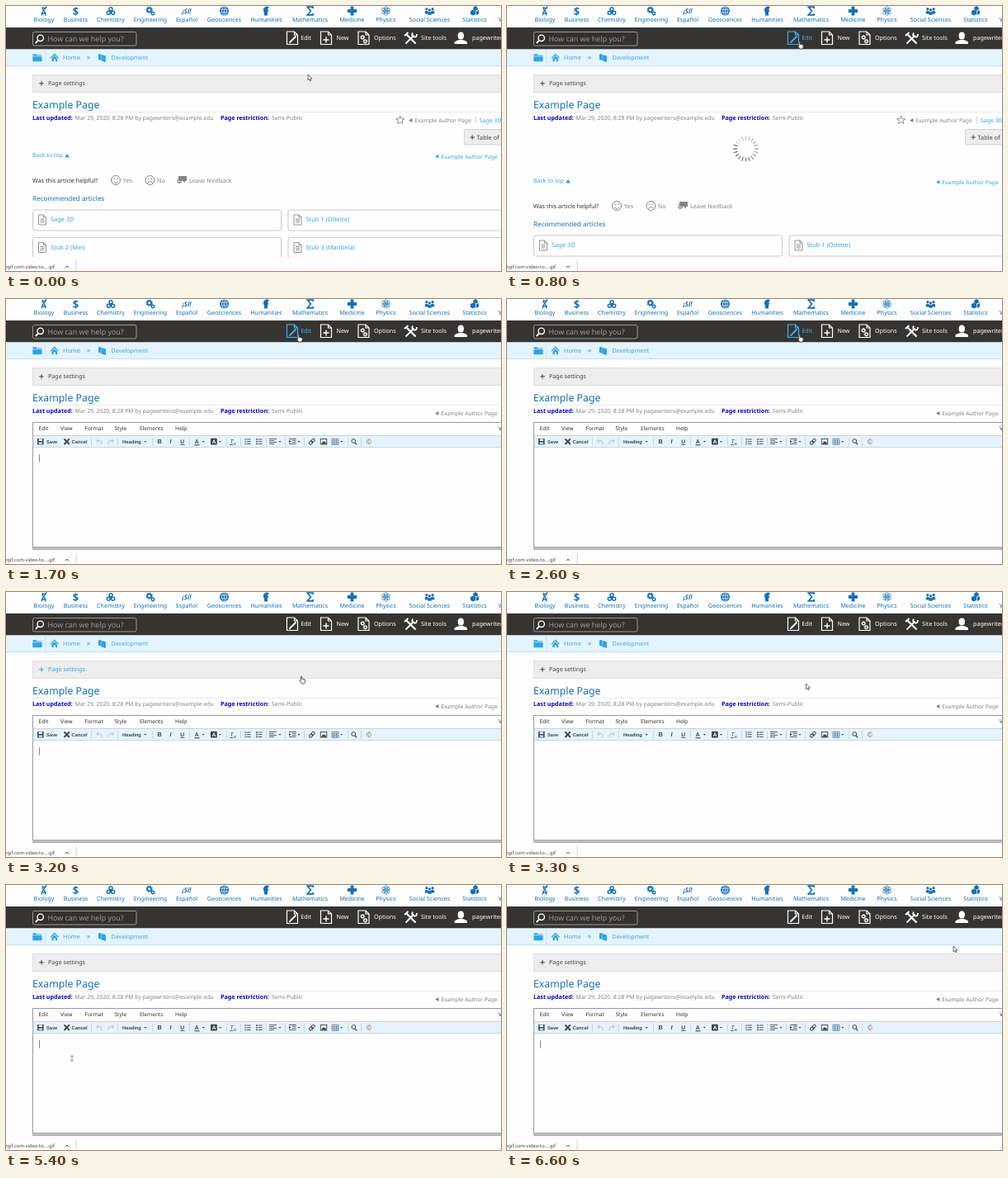
Write an HTML page that moves like this. It is 600x321 px and loops after 6.7 s.

```html
<!DOCTYPE html>
<html lang="en">
<head>
<meta charset="utf-8">
<title>Editing a page</title>
<style>
  html, body { margin: 0; width: 100%; height: 100%; overflow: hidden; background: #fefefe; }
  svg { display: block; width: 100%; height: 100%; text-rendering: geometricPrecision; }
  text { font-family: "Noto Sans", "Open Sans", sans-serif; white-space: pre; }
  .ui { font-family: "Liberation Sans", Arial, sans-serif; }
  .line { fill: none; stroke: currentColor; }
</style>
</head>
<body>
<svg id="stage" viewBox="0 0 600 321"></svg>
<script>
const LOOP = 6700, STEP = 100;
const CLICK = 700, EDITOR_READY = 1500, FOCUS = 4400;
const BLUE = '#1870b2', LINK = '#3aa5e6', GREY = '#858585', DARK = '#444';

const text = (x, y, str, size = 7.1, fill = 'currentColor', extra = '') =>
  `<text x="${x}" y="${y}" font-size="${size}" fill="${fill}" ${extra}>${str}</text>`;
const mid = (x, y, str, size, fill, extra = '') =>
  text(x, y, str, size, fill, `text-anchor="middle" ${extra}`);
const rect = (x, y, w, h, fill, extra = '') =>
  `<rect x="${x}" y="${y}" width="${w}" height="${h}" fill="${fill}" ${extra}/>`;
const line = (d, width = 1, extra = '') => `<path class="line" d="${d}" stroke-width="${width}" ${extra}/>`;
const fill = (d, color = 'currentColor') => `<path d="${d}" fill="${color}"/>`;
const dot = (x, y, r, color = 'currentColor') => `<circle cx="${x}" cy="${y}" r="${r}" fill="${color}"/>`;
const ring = (x, y, r, width = 1, extra = '') =>
  `<circle class="line" cx="${x}" cy="${y}" r="${r}" stroke-width="${width}" ${extra}/>`;
const at = (x, y, body) => `<g transform="translate(${x} ${y})">${body}</g>`;
const group = (id, color, body) => `<g id="${id}" color="${color}">${body}</g>`;
const tint = (color, body) => `<g color="${color}">${body}</g>`;
const gear = (x, y, r) => ring(x, y, r * .6, r * .45) +
  ring(x, y, r * .9, r * .3, `stroke-dasharray="${r * .3534}"`);

// Subject links; every icon is drawn around its own centre
const orbit = angle => `<ellipse class="line" rx="5.4" ry="2.1" stroke-width=".7" transform="rotate(${angle})"/>`;
const person = x => dot(x, -2.3, 1.6) + fill(`M${x - 2.1} 3.5V.8Q${x} -1.2 ${x + 2.1} .8V3.5Z`);
const subjects = [
  [46, 'Biology', line('M2.5 -6C4 -2 -4 -1 -2.5 5.5M-1.5 -5C-4 0 4 0 1.5 5.5M-2 -3.5H2.5M-2.2 3H2', 1.3)],
  [84.5, 'Business', mid(0, 4.6, '$', 13, BLUE, 'font-weight="700"')],
  [127, 'Chemistry', ring(0, -2.3, 2, 1.5) + ring(-2.7, 2.3, 2, 1.5) + ring(2.7, 2.3, 2, 1.5) + dot(0, .6, 1.5)],
  [175, 'Engineering', gear(-1.3, -1.3, 4) + gear(3, 3, 2.7)],
  [219, 'Español', mid(0, 3, '¡Sí!', 8, BLUE, 'font-weight="700" font-style="italic"')],
  [264.5, 'Geosciences', dot(0, 0, 5.6) +
    tint('#fff', line('M-5 -1.7H5M-5 1.7H5M0 -5.5V5.5M-1.5 -5Q-4.5 0 -1.5 5M1.5 -5Q4.5 0 1.5 5', .6))],
  [315.5, 'Humanities', fill('M-2.5 5.5V2Q-5 -2 -2 -4.5Q1 -6.3 3.5 -4.5L1.5 -2 3 0 1.5 1V5.5Z')],
  [368.5, 'Mathematics', line('M3.7 -3V-4.9H-3.2L1 0-3.2 4.9H3.7V3', 1.7)],
  [419.5, 'Medicine', fill('M-1.9 -5.6H1.9V-1.9H5.6V1.9H1.9V5.6H-1.9V1.9H-5.6V-1.9H-1.9Z')],
  [460.5, 'Physics', orbit(30) + orbit(90) + orbit(150) + dot(0, 0, 1.2)],
  [513.5, 'Social Sciences', person(-3.6) + person(3.6) + at(0, 1.2, person(0))],
  [568, 'Statistics', fill('M-5 0 -1.7 -1.4 1 0V4L-2 5.5-5 4ZM-1.7 -4.3 1 -6 3.8 -4.3V-1.5L1 -.3-1.7 -1.7ZM1.7 .4 5 -1V3.4L1.7 5Z')],
];
const subjectBar = tint(BLUE,
  subjects.map(([x, name, icon]) => at(x, 6, icon) + mid(x, 19.2, name)).join('') +
  text(597, 19.2, 'Workforce'));

// Dark tool bar
const sheet = (x, body = '') =>
  line(`M${x} 31H${x + 9}L${x + 13} 35V46.5H${x}ZM${x + 9} 31V35H${x + 13}`, 1.2) + body;
const toolBar =
  rect(0, 26, 600, 26.5, '#363432') +
  rect(32.5, 31.5, 125.5, 16.5, '#33312f', 'rx="2" stroke="#999"') +
  tint('#fff', ring(41.7, 38.8, 3.7, 1.4) + line('M39 41.7 35.8 45', 1.8)) +
  text(50.5, 43.2, 'How can we help you?', 8.9, '#999') +
  group('edit', '#fff',
    sheet(340.5, line('M344.5 43.5 351.5 36.5', 2) + fill('M342.8 45.3 343.5 42.8 345.4 44.5Z')) +
    text(357.3, 41.3, 'Edit', 7.2)) +
  tint('#fff',
    sheet(381.5, line('M388 37.5V44.5M384.5 41H391.5', 1.4)) + text(400.5, 41.3, 'New', 7.2) +
    sheet(427, gear(432.2, 38, 2.8) + gear(435.5, 42.7, 2.8)) + text(446, 41.3, 'Options', 7.2) +
    line('M485.5 34.5 496.5 45.5', 2.4) + line('M494.5 35.5 484.5 45.5', 1.8) +
    line('M493 32.5Q491 36 494.5 37.3T498 34M483 36 487.5 32', 1.9) +
    text(503, 41.3, 'Site tools', 7.2) +
    `<ellipse cx="551.3" cy="36" rx="3.7" ry="4.5" fill="#fff"/>` +
    fill('M543.5 46V43.8Q544 42.5 549.3 41H553.3Q558.6 42.5 559 43.8V46Z') +
    text(565, 41.3, 'pagewriters', 7.2));

const breadcrumbs =
  rect(0, 52.5, 600, 20.5, '#e4f4fe') + rect(0, 72, 600, 1, '#bfe4f8') +
  rect(47.3, 53, .8, 19, '#bfe4f8') +
  tint('#2fa4e4',
    fill('M32.5 58.2H36.5L37.7 59.5H43.3V60.6H32.5Z') + fill('M32.3 61.2H43.6V67.2H32.3Z') +
    fill('M53.5 62.8 58.8 57.5 64 62.8 63 63.5 58.8 59.2 54.5 63.5Z') +
    fill('M55.5 63.5 58.8 60.3 62 63.5V67.3H60V64.5H57.6V67.3H55.5Z') +
    fill('M112 58.5 115 57.8V65.8L112 64.8Z') + fill('M115.4 58.8 121 60.5V68L115.4 66.2Z')) +
  tint(LINK, text(69, 65.2, 'Home', 7.3) + mid(100, 65, '»', 9) + text(127.5, 65.2, 'Development'));

const heading =
  rect(32.5, 83.5, 570, 21, '#ededed', 'stroke="#dedede"') +
  group('settings', DARK, line('M40.2 93.8H45.8M43 91V96.6', 1) + text(51, 96.2, 'Page settings')) +
  text(32, 124.3, 'Example Page', 12.3, BLUE) +
  rect(32, 128, 568, .8, '#e6e6e6') +
  tint('#0606c4', text(32, 137.6, 'Last updated:', 7.15, undefined, 'font-weight="700"') +
    text(260, 137.6, 'Page restriction:', 7.15, undefined, 'font-weight="700"')) +
  text(83.5, 137.6, 'Mar 29, 2020, 8:28 PM by pagewriters@example.edu', 6.85, GREY) +
  text(322, 137.6, 'Semi-Public', 6.9, GREY);

const previous = (x, y, color) => tint(color,
  fill(`M${x} ${y - 2.5}L${x + 4.5} ${y - 5}V${y}Z`) + text(x + 7.3, y, 'Example Author Page', 6.75));

// Reading view
const card = (x, y, name) =>
  rect(x, y, 301, 25, '#fefefe', 'rx="2.5" stroke="#cbcbcb"') +
  at(x + 7, y + 6, tint('#888', line('M0 0H6L9 3V12H0ZM6 0V3H9M2 5H7M2 7H7M2 9H7', .9))) +
  text(x + 21.5, y + 14, name, 7.45, LINK);
const face = (x, mouth) =>
  ring(x, 211, 5.5) + dot(x - 2, 209.3, .8) + dot(x + 2, 209.3, .8) + line(`M${x - 3} ${mouth}`, .9);
const reader =
  tint(GREY, line('M477.7 133 479.1 136.6 482.8 136.8 479.9 139.1 480.9 142.6 477.7 140.6 474.5 142.6 475.5 139.1 472.6 136.8 476.3 136.6Z', .9)) +
  previous(488, 141, GREY) + rect(569, 134, .8, 8, '#ccc') + text(574, 141, 'Sage 3D', 6.9, LINK) +
  rect(555.5, 149.5, 50, 18.5, '#ededed', 'rx="2" stroke="#d2d2d2"') +
  tint(DARK, line('M562.5 159H568M565.2 156.2V161.8', 1) + text(570.5, 161.7, 'Table of', 7.4)) +
  group('lower', LINK,
    text(32, 183.4, 'Back to top', 7) + fill('M71 183.5 74 178.7 77 183.5Z') +
    previous(520, 184.7, LINK) +
    text(32, 214.3, 'Was this article helpful?', 7.2, '#333') +
    tint(GREY,
      face(133, '212.5Q133 216.5 136 212.5') + text(142, 214.3, 'Yes') +
      face(174.5, '214.5Q174.5 210.5 177.5 214.5') + text(183, 214.3, 'No') +
      fill('M209 206H219V212H217V214.5L214.5 212H209Z') +
      fill('M207.5 209H208.3V212.8H213V214H211L209.3 216V214H207.5Z') +
      text(222, 214.3, 'Leave feedback')) +
    text(32, 236, 'Recommended articles', 8.15, BLUE) +
    card(32.5, 247, 'Sage 3D') + card(342, 247, 'Stub 1 (Odette)') +
    card(32.5, 280.5, 'Stub 2 (Mei)') + card(342, 280.5, 'Stub 3 (Maribela)'));

const TICKS = 20;
const spinner = Array.from({ length: TICKS }, (_, i) =>
  `<path d="M0 -10.5V-15.5" stroke="#555" stroke-width="1.2" transform="translate(289.5 173) rotate(${i * 360 / TICKS})"/>`).join('');

// Editor
const bold = (x, str, size = 5.8, extra = '') =>
  text(x, 174.9, str, size, 'currentColor', `class="ui" font-weight="700" ${extra}`);
const drop = x => fill(`M${x - 1.5} 172H${x + 1.5}L${x} 173.7Z`);
const rows = (x, widths) => line(widths.map((w, i) => `M${x} ${169.5 + i * 2}h${w}`).join(''), .8);
const list = (x, marker) => line([170, 172.7, 175.4].map(y => `M${x - 1.3} ${y}h5`).join(''), .9) +
  [170, 172.7, 175.4].map(marker).join('');
const menu = [[39.5, 'Edit'], [66, 'View'], [95.5, 'Format'], [131.5, 'Style'], [162, 'Elements'], [205, 'Help'], [597, 'View']];
const editor =
  previous(520, 141, GREY) +
  rect(32.5, 149.5, 580, 154, '#fefefe', 'stroke="#999"') +
  menu.map(([x, name]) => text(x, 159.2, name, 6.6, '#333')).join('') +
  rect(33, 165.5, 570, 14.3, '#e5f3fc', 'stroke="#c2cbd1" stroke-width=".8"') +
  [103, 135, 177, 222, 267, 284, 315, 338, 361, 414, 430].map(x => rect(x, 168, .7, 10, '#bccbd4')).join('') +
  tint(DARK,
    rect(38, 169, 7.6, 7.4, '#34506a') + rect(39.7, 169.5, 4.2, 2.5, '#fff') + rect(39.7, 173.5, 4.2, 2.2, '#dde8f0') +
    bold(49, 'Save', 5.7) + line('M70.5 169.3 76.8 176M76.8 169.3 70.5 176', 1.9) + bold(79.5, 'Cancel') +
    tint('#b5bcc1', line('M112 169.5 109.8 171.7 112 174M110 171.7H114Q117 172.5 115.5 176M128 169.5 130.2 171.7 128 174M130 171.7H126Q123 172.5 124.5 176', .9)) +
    bold(141, 'Heading') + drop(169) +
    bold(183.5, 'B', 7.3) + bold(198.5, 'I', 7.3, 'font-style="italic"') +
    bold(211.2, 'U', 6.8) + line('M211.2 176.5H216.5', .8) +
    bold(228.8, 'A', 7) + line('M228.5 176.8H234.5', 1.1) + drop(239.3) +
    rect(248, 168.8, 7.8, 7.8, 'currentColor', 'rx="1"') + mid(252, 175, 'A', 6.5, '#fff', 'class="ui" font-weight="700"') + drop(259.5) +
    text(271.5, 174.9, 'T', 7, undefined, 'class="ui" font-style="italic"') +
    line('M271 176.6H275M276 174.3 278.5 176.8M278.5 174.3 276 176.8', .8) +
    list(293, y => rect(289.6, y - 1, .9, 2, 'currentColor')) +
    list(307, y => dot(304, y, .9)) +
    rows(319, [9, 6, 9, 6]) + drop(332) +
    rows(343, [8.5, 0, 0, 8.5]) + rows(347, [4.5, 4.5, 4.5]) + fill('M343 170.8 345.6 172.6 343 174.4Z') + drop(355) +
    `<g transform="rotate(-45 371 172.7)" class="line" stroke-width="1"><rect x="366.8" y="171" width="4.6" height="3.2" rx="1.5"/><rect x="370.4" y="171" width="4.6" height="3.2" rx="1.5"/></g>` +
    rect(381.3, 169.5, 7.5, 6.5, 'none', 'stroke="#444" stroke-width=".9"') + fill('M382 175.7 384.5 172 386 173.6 387 172.6 388.3 175.7Z') +
    tint('#557a9c', line('M395 169.3H403V176.3H395ZM395 171.8H403M395 174.1H403M397.7 169.3V176.3M400.4 169.3V176.3', .8)) + drop(406.7) +
    ring(421.3, 172, 2.4, 1) + line('M423 174 425.3 176.4', 1.3)) +
  tint('#b59a90', ring(439.8, 172.7, 2.6, .9) + line('M441.5 169Q439 169.5 439 172.7T441.5 176.4', .9)) +
  rect(32, 300, 568, 3.7, '#bdbdbd') + rect(32, 300, 568, .8, '#a2a2a2') +
  rect(40, 188.3, .8, 9.4, '#666', 'id="caret"');

const shelf =
  rect(0, 304.3, 600, 17, '#fefefe') +
  text(59, 318.3, 'ezgif.com-video-to....gif', 5.8, '#444', 'text-anchor="end"') +
  tint('#555', line('M72 317.2 74 315 76 317.2', 1)) +
  rect(84.7, 307.5, .8, 14, '#ccc');

const cursors =
  '<g id="cursor" stroke-linejoin="round">' +
  '<path id="arrow" d="M0 0V6.8L1.6 5.4 2.7 7.8 3.8 7.3 2.8 5H4.9Z" fill="#fff" stroke="#333" stroke-width=".7"/>' +
  '<path id="hand" d="M-.7 .6Q0 -.4 .7 .6V3.2L4.6 4.1V6.5L3.8 9H.4L-2 5.6Q-1.8 4.6 -.7 5.4Z" fill="#fff" stroke="#333" stroke-width=".8"/>' +
  '<path id="beam" d="M-1.5 -3H1.5M0 -3V3M-1.5 3H1.5" fill="none" stroke="#666" stroke-width=".8"/></g>';

const stage = document.getElementById('stage');
stage.innerHTML = rect(0, 0, 600, 321, '#fefefe') + subjectBar + toolBar + breadcrumbs + heading +
  group('reader', DARK, reader) + group('spinner', DARK, spinner) + group('editor', DARK, editor) +
  shelf + cursors;

const $ = id => document.getElementById(id);
const show = (id, visible) => { $(id).style.display = visible ? '' : 'none'; };
const ticks = [...$('spinner').children];

// Pointer path: time, x, y
const path = [
  [0, 366, 83], [500, 354.5, 43], [2700, 354.5, 43], [3200, 358, 102], [3400, 367, 120],
  [3800, 128, 215], [4100, 80, 210], [6000, 80, 210], [6600, 541, 74], [LOOP, 541, 74],
];
function pointerAt(t) {
  const next = path.findIndex(key => key[0] > t);
  const [t0, x0, y0] = path[next - 1], [t1, x1, y1] = path[next];
  const k = (t - t0) / (t1 - t0);
  return [x0 + (x1 - x0) * k, y0 + (y1 - y0) * k];
}

const caretOn = t => t < FOCUS
  ? (t - 1700 + 1010) % 1010 < 510
  : (t - FOCUS) % 1000 < 500;

function draw(t) {
  const [x, y] = pointerAt(t);
  const editing = t >= EDITOR_READY, loading = t >= CLICK && !editing;
  const overEdit = x > 338 && x < 374 && y > 28 && y < 52;
  const overSettings = y > 86 && y < 104;
  const overPage = editing && y > 182;

  show('reader', !editing);
  show('spinner', loading);
  show('editor', editing);
  show('caret', caretOn(t));
  $('lower').setAttribute('transform', `translate(0 ${loading ? 31 : 0})`);
  ticks.forEach((tick, i) => {
    const age = (t / STEP * 2 - i + 10 * TICKS) % TICKS;
    tick.setAttribute('opacity', 1 - .8 * age / TICKS);
  });

  $('edit').setAttribute('color', overEdit ? '#3db2f5' : '#fff');
  $('settings').setAttribute('color', overSettings ? LINK : DARK);
  $('cursor').setAttribute('transform', `translate(${x} ${y})`);
  show('hand', overEdit || overSettings);
  show('beam', overPage);
  show('arrow', !overEdit && !overSettings && !overPage);
}

const start = performance.now();
function frame() {
  const t = (performance.now() - start) % LOOP;
  draw(Math.floor(t / STEP) * STEP);
  requestAnimationFrame(frame);
}
frame();
</script>
</body>
</html>
```
